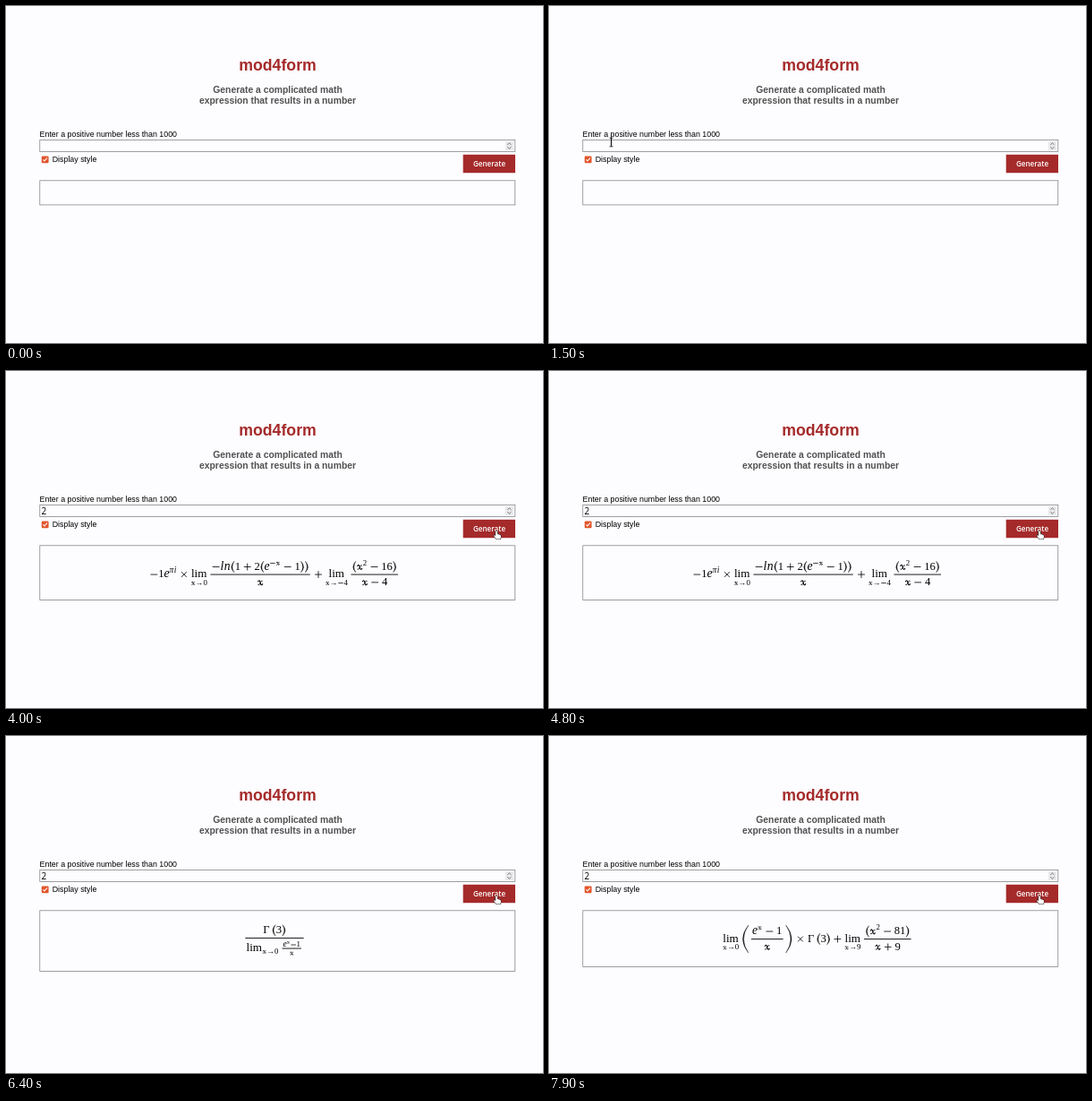
Recreate the animation shown at these times as an HTML page with a canvas. Size 600x376 px, loop 8 s.

```html
<!DOCTYPE html>
<html lang="en">
<head>
<meta charset="utf-8">
<title>mod4form</title>
<style>
html, body { margin: 0; width: 100%; height: 100%; overflow: hidden; background: #fdfcfe; }
canvas { display: block; }
</style>
</head>
<body>
<canvas id="stage" width="600" height="376"></canvas>
<script>
const ctx = document.getElementById('stage').getContext('2d');
const LOOP = 8000, STEP = 100;
const SANS = '"Liberation Sans", Arial, sans-serif';
const UI = '"Open Sans", "Noto Sans", sans-serif';
const SERIF = '"Liberation Serif", "Times New Roman", serif';
const BG = '#fdfcfe', BROWN = '#a52a2a', ORANGE = '#e2552a';

function label(text, x, y, font, color, align = 'left') {
  ctx.font = font;
  ctx.fillStyle = color;
  ctx.textAlign = align;
  ctx.fillText(text, x, y);
}

function line(points, width, color = '#000') {
  ctx.beginPath();
  points.forEach(([x, y], i) => i ? ctx.lineTo(x, y) : ctx.moveTo(x, y));
  ctx.lineWidth = width;
  ctx.strokeStyle = color;
  ctx.stroke();
}

function outline(x, y, w, h, color, width) {
  ctx.lineWidth = width;
  ctx.strokeStyle = color;
  ctx.strokeRect(x, y, w, h);
}

// Math layout: a box has width w, ascent a, descent d and draw(x, baseline).
const EM = 12.6, SMALL = EM * 0.7, AXIS = EM * 0.25;
const ADVANCE = { ' ': .222, '~': .167, '(': .389, ')': .389, '−': .778, '+': .778, '×': .778,
  '=': .778, '→': 1, '∞': 1, 'Γ': .625, 'π': .57, x: .572, e: .466, n: .6, l: .298, i: .345 };

function bow(x, mid, h, w, side) {
  const edge = x + (side < 0 ? w * .85 : w * .15);
  const reach = side * w * 1.25;
  ctx.beginPath();
  ctx.moveTo(edge, mid - h / 2);
  ctx.quadraticCurveTo(edge + reach, mid, edge, mid + h / 2);
  ctx.quadraticCurveTo(edge + reach - side * 2, mid, edge, mid - h / 2);
  ctx.fillStyle = '#000';
  ctx.fill();
  ctx.lineWidth = .35;
  ctx.strokeStyle = '#000';
  ctx.stroke();
}

// The curly math x: a heavy falling stroke and a light rising one.
function curlyX(x, y, s) {
  const thin = new Path2D('M.5 -.36Q.38 -.5 .29 -.21Q.2 .07 .07 -.05');
  const heavy = new Path2D('M.07 -.3Q.22 -.58 .29 -.21Q.35 .12 .51 -.13');
  ctx.save();
  ctx.translate(x, y);
  ctx.scale(s, s);
  ctx.strokeStyle = '#000';
  ctx.lineWidth = .06;
  ctx.stroke(thin);
  ctx.lineWidth = .085;
  ctx.stroke(heavy);
  ctx.restore();
}

function operator(c, x, y, s) {
  const m = x + s * .389, k = y - s * .25, r = s * .31, q = s * .23, g = s * .12;
  const w = Math.max(.75, s * .065);
  if (c === '×') {
    line([[m - q, k - q], [m + q, k + q]], w);
    line([[m - q, k + q], [m + q, k - q]], w);
  } else if (c === '=') {
    line([[m - r, k - g], [m + r, k - g]], w);
    line([[m - r, k + g], [m + r, k + g]], w);
  } else {
    line([[m - r, k], [m + r, k]], w);
    if (c === '+') line([[m, k - r], [m, k + r]], w);
  }
}

function glyph(c, s) {
  const w = (ADVANCE[c] || .5) * s;
  return { w, a: s * .7, d: '()'.includes(c) ? s * .25 : 0, draw(x, y) {
    if (c === ' ' || c === '~') return;
    if (c === 'x') curlyX(x, y, s);
    else if ('()'.includes(c)) bow(x, y - s * .25, s, w, c === '(' ? -1 : 1);
    else if ('−+×='.includes(c)) operator(c, x, y, s);
    else {
      const italic = /[a-zπ]/.test(c);
      label(c, x + w / 2, y, `${italic ? 'italic ' : ''}${italic ? s * 1.08 : s}px ${SERIF}`, '#000', 'center');
    }
  } };
}

function row(...boxes) {
  return {
    w: boxes.reduce((sum, b) => sum + b.w, 0),
    a: Math.max(...boxes.map(b => b.a)),
    d: Math.max(...boxes.map(b => b.d)),
    draw(x, y) { for (const b of boxes) { b.draw(x, y); x += b.w; } }
  };
}

function raise(box, up, ascent) {
  return { w: box.w + EM * .05, a: ascent, d: 0, draw: (x, y) => box.draw(x, y - up) };
}

function math(text, s = EM) {
  const parts = [...text.matchAll(/\^\{(.*?)\}|./gu)];
  return row(...parts.map(([c, power]) =>
    power ? raise(math(power, s * .7), s * .4, s * .75) : glyph(c, s)));
}

function frac(num, den, small = false) {
  const up = Math.max((small ? .394 : .677) * EM, num.d + AXIS + (small ? .05 : .15) * EM);
  const down = Math.max((small ? .345 : .686) * EM, den.a - AXIS + (small ? .1 : .25) * EM);
  const bar = Math.max(num.w, den.w) + (small ? .14 : .2) * EM, pad = EM * .12;
  return { w: bar + 2 * pad, a: up + num.a, d: down + den.d, draw(x, y) {
    const mid = x + pad + bar / 2;
    line([[mid - bar / 2, y - AXIS], [mid + bar / 2, y - AXIS]], .9);
    num.draw(mid - num.w / 2, y - up);
    den.draw(mid - den.w / 2, y + down);
  } };
}

function lim(target, inline = false) {
  const sub = math('x→' + target, SMALL), word = EM * 1.389;
  const w = inline ? word + sub.w + EM * .05 : Math.max(word, sub.w);
  return row({ w, a: EM * .7, d: EM * (inline ? .2 : .72), draw(x, y) {
    const left = inline ? x : x + (w - word) / 2;
    label('lim', left, y, `${EM * 1.04}px ${SERIF}`, '#000');
    if (inline) sub.draw(x + word, y + EM * .2);
    else sub.draw(x + (w - sub.w) / 2, y + EM * .68);
  } }, math('~'));
}

function fence(box, h, w) {
  const side = dir => ({ w: w * EM, a: h / 2 + AXIS, d: h / 2 - AXIS,
    draw: (x, y) => bow(x, y - AXIS, h, w * EM, dir) });
  return row(side(-1), box, side(1));
}

function sum() {
  const top = math('∞', SMALL), low = math('i=0', SMALL), w = EM * 1.056;
  return { w, a: EM * 1.4, d: EM * 1.06, draw(x, y) {
    const t = y - AXIS - 6, b = t + 12.4;
    line([[x + w, t + 3], [x + w - 1, t], [x + 1, t]], .8);
    line([[x + 1, t], [x + 6.2, t + 6.4]], 1.4);
    line([[x + 6.2, t + 6.4], [x + 1, b], [x + w - 1, b], [x + w, b - 3]], .9);
    top.draw(x + (w - top.w) / 2, y - EM * 1.02);
    low.draw(x + (w - low.w) / 2, y + EM * .9);
  } };
}

const tiny = (num, den) => frac(math(num, SMALL), math(den, SMALL), true);
const wide = (num, den) => frac(math(num), math(den));
const series = () => row(sum(), math('~'), fence(tiny('9', '10'), 18, .458),
  raise(math('i', SMALL), EM * .65, EM));

// Each result: start time, baseline, bottom edge of the panel, expression.
const results = [
  [4000, 230.2, 255.6, row(math('−1e^{πi} × '), lim('0'), wide('−ln(1 + 2(e^{−x} − 1))', 'x'),
    math(' + '), lim('−4'), wide('(x^{2} − 16)', 'x − 4'))],
  [4900, 245, 273.5, frac(series(), math('Γ~(3) + 3'))],
  [5400, 228.6, 262.5, frac(math('Γ~(3)'), row(lim('1', true), tiny('ln(x)', 'x−1')))],
  [6000, 230.2, 255.6, row(math('−1e^{πi} + '), lim('0'), wide('e^{x} − 1', 'x'))],
  [6300, 228.6, 262.5, frac(math('Γ~(3)'), row(lim('0', true), tiny('e^{x}−1', 'x')))],
  [6700, 228.6, 263.5, frac(math('Γ~(3)'), row(math('−1e^{πi} × '), lim('1', true), tiny('ln(x)', 'x−1')))],
  [6900, 246.6, 278.6, frac(series(), row(lim('∞', true), tiny('25x^{2}+3x', '5x^{2}')))],
  [7300, 228.6, 265.5, frac(math('Γ~(3) + Γ~(3)'), row(lim('1', true), tiny('(x^{2}−1)', 'x−1')))],
  [7700, 229.7, 257.4, row(lim('0'), fence(wide('e^{x} − 1', 'x'), 31, .8),
    math(' × Γ~(3) + '), lim('9'), wide('(x^{2} − 81)', 'x + 9'))]
];

const pointerPath = [
  [0, 418, 378], [100, 418, 368], [500, 260, 265], [900, 110, 182], [1200, 74, 155], [1500, 69.5, 152],
  [2100, 69.5, 152], [2300, 61, 150], [2500, 61, 150], [2700, 300, 205], [3000, 545, 183],
  [3300, 547, 180], [3600, 547, 180], [3700, 548, 178]
];

function pointerAt(t) {
  const i = pointerPath.findIndex(p => p[0] > t);
  if (i < 0) return pointerPath[pointerPath.length - 1].slice(1);
  const [t0, x0, y0] = pointerPath[i - 1], [t1, x1, y1] = pointerPath[i];
  const k = (t - t0) / (t1 - t0);
  return [x0 + (x1 - x0) * k, y0 + (y1 - y0) * k];
}

function shape(path, x, y, fill, edge, width) {
  ctx.save();
  ctx.translate(x, y);
  const p = new Path2D(path);
  ctx.lineJoin = 'round';
  ctx.lineWidth = width;
  ctx.strokeStyle = edge;
  ctx.stroke(p);
  ctx.fillStyle = fill;
  ctx.fill(p);
  ctx.restore();
}

function drawPointer(t) {
  const [x, y] = pointerAt(t);
  const overField = x > 37 && x < 558 && y > 146 && y < 163;
  if (overField) {
    line([[x, y - 4.5], [x, y + 4.5]], 1);
    line([[x - 2, y - 4.8], [x + 2, y - 4.8]], .8);
    line([[x - 2, y + 4.8], [x + 2, y + 4.8]], .8);
  } else if (t > 3000) {
    shape('M-1 1Q0 -.4 1 1L1.2 4L4 4.8Q5.2 5.2 5 6.6L4.4 9.4H0L-2.8 6.2Q-3 5 -2 5.2L-1 6Z', x, y, '#fff', '#222', 1.1);
  } else {
    shape('M0 0V8.6L2 7L3.4 10L4.8 9.4L3.4 6.5H6Z', x, y, '#111', '#fff', 1.4);
  }
}

function drawPage(focused, typed) {
  ctx.fillStyle = BG;
  ctx.fillRect(0, 0, 600, 376);
  label('mod4form', 303.5, 72, `bold 17.7px ${SANS}`, BROWN, 'center');
  label('Generate a complicated math', 303.5, 97, `bold 10.36px ${SANS}`, '#515151', 'center');
  label('expression that results in a number', 303.5, 108.5, `bold 10.36px ${SANS}`, '#515151', 'center');
  label('Enter a positive number less than 1000', 37.6, 146.4, `8.85px ${SANS}`, '#000');

  if (focused) outline(37.3, 148.9, 532.2, 14.4, '#d2522c', 1.8);
  else outline(37.8, 149.4, 531, 13.2, '#808084', .75);
  ctx.fillStyle = '#e9e9eb';
  ctx.fillRect(558, 151, 9, 10);
  line([[560.3, 154.8], [562.4, 152.9], [564.5, 154.8]], .9, '#666');
  line([[560.3, 157.3], [562.4, 159.2], [564.5, 157.3]], .9, '#666');
  if (typed) label('2', 39.5, 159.7, `500 10px ${UI}`, '#000');
  if (focused) {
    const caret = typed ? 45.5 : 40.5;
    line([[caret, 151], [caret, 161]], .9);
  }

  ctx.fillStyle = ORANGE;
  ctx.beginPath();
  ctx.roundRect(39.8, 167.4, 7.8, 7.8, 1.2);
  ctx.fill();
  line([[41.5, 171.3], [43, 172.9], [46, 169.5]], 1.1, '#fff');
  label('Display style', 51.7, 174.2, `8.85px ${SANS}`, '#000');

  ctx.fillStyle = BROWN;
  ctx.fillRect(510.7, 165.8, 58.3, 20.4);
  label('Generate', 540, 179, `600 8.1px ${UI}`, '#fff', 'center');
}

function drawResult(t) {
  const result = results.filter(r => r[0] <= t).pop();
  const bottom = result ? result[2] : 221.9;
  outline(37.8, 194.8, 531, bottom - 194.8, '#808084', .75);
  if (result) result[3].draw(300 - result[3].w / 2, result[1]);
}

function frame(now) {
  const t = Math.floor(now % LOOP / STEP) * STEP;
  drawPage(t >= 1600 && t < 4000, t >= 2500);
  drawResult(t);
  drawPointer(t);
  requestAnimationFrame(frame);
}
requestAnimationFrame(frame);
</script>
</body>
</html>
```
